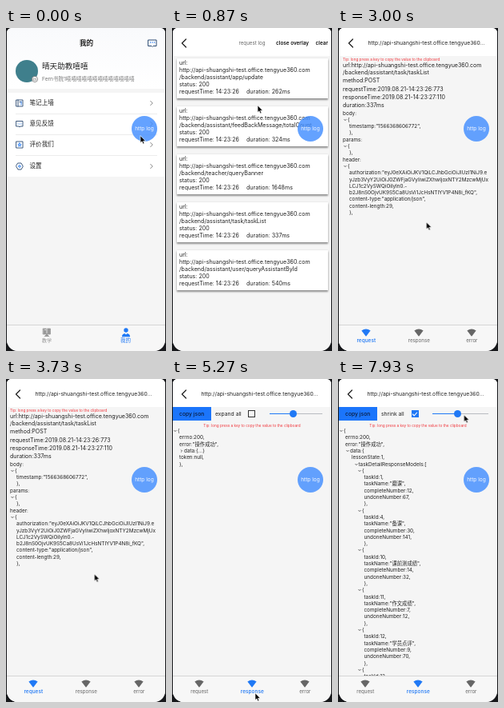
An HTML page that plays this animation: 200 by 404 pixels, repeating every 8000 ms.

```html
<!DOCTYPE html>
<html>
<head>
<meta charset="utf-8">
<title>Request log demo</title>
<style>
  :root { --blue: #2079f5; --grey: #666; }
  html, body { margin: 0; width: 100%; height: 100%; overflow: hidden; background: #17181b; }
  body { font: 6.35px Inter, "Noto Sans CJK SC", "Noto Sans CJK", sans-serif; color: #222; }
  #stage { position: relative; width: 200px; height: 404px; overflow: hidden; }
  #screen { position: absolute; inset: 0 1.5px 0 1px; overflow: hidden; border-radius: 6px 6px 14px 14px; background: #f5f5f5; }
  .page { position: absolute; left: -1px; top: 0; width: 200px; height: 404px; background: #f5f5f5; overflow: hidden; }
  .page *, .overlay { position: absolute; box-sizing: border-box; }
  .t { white-space: pre; line-height: 10px; margin-top: -5px; }
  .c { transform: translateX(-50%); }
  .bar { left: 0; top: 0; width: 200px; height: 34.5px; background: #fff; }
  .tabs { left: 0; top: 371px; width: 200px; height: 33px; background: #f7f7f7; border-top: .5px solid #d5d5d5; }
  svg { overflow: visible; fill: none; stroke-linecap: round; stroke-linejoin: round; }
  .card { left: 6px; width: 189px; height: 50px; background: #fff; box-shadow: 0 1.5px 2px rgba(0,0,0,.4), 0 0 1.5px rgba(0,0,0,.15); }
  .card div { left: 3px; font-size: 7.1px; }
  .tip { font-size: 4.7px; color: #f0353b; }

  /* One 8 s clock for everything */
  .page, .overlay, .step { animation: 8s linear infinite; }
  #home { animation-name: homeOut; }
  #log { animation-name: logMove; }
  #detail { animation-name: detailIn; }
  #cursor { left: 0; top: 0; animation-name: cursor; }
  .step { animation-timing-function: step-end; }
  .before { animation-name: before; }
  .after { animation-name: after; }
  .closed { animation-name: closed; }
  .open { animation-name: open; }

  @keyframes homeOut {
    0%, .7% { transform: none; animation-timing-function: cubic-bezier(.15,.7,.3,1); }
    5%, 100% { transform: translateX(-60px); }
  }
  @keyframes logMove {
    0%, .7% { transform: translateX(200px); animation-timing-function: cubic-bezier(.15,.7,.3,1); }
    5%, 34% { transform: none; animation-timing-function: cubic-bezier(.15,.6,.3,1); }
    37.5%, 100% { transform: translateX(-60px); }
  }
  @keyframes detailIn {
    0%, 34% { transform: translateX(200px); animation-timing-function: cubic-bezier(.15,.6,.3,1); }
    37.5% { transform: translateX(1px); }
    42%, 100% { transform: none; }
  }
  @keyframes before { 0% { visibility: visible; } 59.1%, 100% { visibility: hidden; } }
  @keyframes after { 0% { visibility: hidden; } 59.1%, 100% { visibility: visible; } }
  @keyframes closed { 0% { visibility: hidden; } 59.1% { visibility: visible; } 85.9%, 100% { visibility: hidden; } }
  @keyframes open { 0% { visibility: hidden; } 85.9%, 100% { visibility: visible; } }
  @keyframes cursor {
    0%, 5.5% { transform: translate(168px,135px); }
    10.875% { transform: translate(107px,97px); }
    13.5% { transform: translate(113px,79px); }
    17.5% { transform: translate(160px,122px); }
    21.6% { transform: translate(122px,161px); }
    22.5%, 24.5% { transform: translate(121px,178px); animation-timing-function: ease-out; }
    29.2%, 46.2% { transform: translate(110.5px,243px); animation-timing-function: ease-in-out; }
    53.4%, 71.2% { transform: translate(104px,393px); animation-timing-function: ease-in-out; }
    81.6%, 87.5% { transform: translate(93px,43px); animation-timing-function: ease-in-out; }
    91.6%, 92.8% { transform: translate(27px,44px); animation-timing-function: ease-out; }
    99.1%, 100% { transform: translate(157.5px,45px); }
  }
</style>
</head>
<body>
<div id="stage">
  <div id="screen">
    <div class="page" id="home"></div>
    <div class="page" id="log"></div>
    <div class="page" id="detail"></div>
  </div>
  <div class="overlay" style="left:157px;top:110px;width:32px;height:32px;border-radius:50%;background:rgba(66,142,255,.82);color:#f4f7fc;font-size:6.6px;line-height:32px;text-align:center;white-space:pre">http log</div>
  <svg class="overlay" id="cursor" width="8" height="11"><path d="M0 0V8.6L2 6.8L3.4 10L4.9 9.3L3.5 6.3H6.2Z" fill="#000" stroke="#fff" stroke-width=".6"/></svg>
</div>
<script>
const $ = id => document.getElementById(id);

// Text at x, vertically centred on y
const text = (s, x, y, style = '', cls = '') =>
  `<div class="t ${cls}" style="left:${x}px;top:${y}px;${style}">${s}</div>`;
const box = (x, y, w, h, style) =>
  `<div style="left:${x}px;top:${y}px;width:${w}px;height:${h}px;${style}"></div>`;
// Line drawing whose origin is (x, y)
const icon = (x, y, d, stroke, width = 1, fill = 'none') =>
  `<svg width="1" height="1" style="left:${x}px;top:${y}px"><path d="${d}" stroke="${stroke}" stroke-width="${width}" fill="${fill}"/></svg>`;
const group = (cls, html) => `<div class="step ${cls}" style="left:0;top:0">${html}</div>`;
const circle = r => `M${-r} 0a${r} ${r} 0 1 0 ${2 * r} 0a${r} ${r} 0 1 0 ${-2 * r} 0`;
const back = icon(15, 18.5, 'M2.5 -5L-2.5 0L2.5 5', '#222', 1.3);

function home() {
  const navy = '#2c4a72', blue = 'var(--blue)';
  const frame = 'M-4 -4H4V4H-4Z';
  const rows = [
    ['笔记上墙', frame + 'M-2 -4V4M0 -1.5H2', 'M2 -2V2'],
    ['意见反馈', 'M-4 -3.5H4V3H1L0 4L-1 3H-4Z', 'M-2 0h.1M0 0h.1M2 0h.1'],
    ['评价我们', frame, 'M0 -2L.6 -.6L2 -.5L1 .5L1.3 2L0 1.2L-1.3 2L-1 .5L-2 -.5L-.6 -.6Z'],
    ['设置', 'M-2 -4H2L4.3 0L2 4H-2L-4.3 0Z', circle(1.3)]
  ];
  let h = box(0, 0, 200, 76, 'background:linear-gradient(#f9fafc,#fff)')
    + text('我的', 100.5, 19, 'font-size:8.6px;font-weight:600', 'c')
    + icon(183, 18.5, 'M-5 -4H5V3.5H1L0 4.5L-1 3.5H-5Z', navy)
    + icon(183, 18.3, 'M-2.5 0h.1M0 0h.1M2.5 0h.1', blue, 1.3)
    + icon(26, 54, circle(14), 'none', 0, '#3f7f8c')
    + icon(36, 63.5, circle(3.6), '#777', .8, '#fff')
    + icon(36, 63.5, 'M-1.5 -.8H1.5V1.3H-1.5Z', '#777', .6)
    + text('晴天助教嘻嘻', 45, 48, 'font-size:9.6px;font-weight:500')
    + text('Fern书院1' + '嘻'.repeat(13), 45, 64, 'font-size:6.6px;color:#777')
    + box(0, 81, 200, 105, 'background:#fff');
  rows.forEach(([label, outer, inner], i) => {
    const y = 94 + i * 26.2;
    h += icon(17, y, outer, navy, .9) + icon(17, y, inner, blue, .9)
      + text(label, 29.5, y, 'font-size:7.6px;font-weight:500')
      + icon(181.5, y, 'M-1.3 -2.6L1.3 0L-1.3 2.6', '#777', .9);
    if (i < 3) h += box(12, y + 13, 177, .5, 'background:#ececec');
  });
  h += '<div class="tabs"></div>'
    + icon(51, 380.5, 'M-4.5 -5H4.5V2H-4.5ZM-3 5L0 2L3 5', '#999', .8, '#999')
    + icon(51, 379, 'M0 -3.5V2.5M-2.5 -1.5H-1.5', '#f7f7f7', .8)
    + icon(149.5, 378.3, circle(2.7), 'none', 0, blue)
    + icon(149.5, 383.5, 'M-5 2.3V1Q-4.5 -1.5 -1.5 -2L0 -.5L1.5 -2Q4.5 -1.5 5 1V2.3Z', 'none', 0, blue)
    + text('教学', 51, 391, 'font-size:6.2px;color:#999', 'c')
    + text('我的', 149.5, 391, `font-size:6.5px;color:${blue}`, 'c');
  return h;
}

function log() {
  const calls = [
    ['assistant/app/update', 262], ['assistant/feedBackMessage/totalCount', 324],
    ['teacher/queryBanner', 1648], ['assistant/task/taskList', 337],
    ['assistant/user/queryAssistantById', 540]
  ];
  const bold = 'font-size:6.4px;font-weight:600;color:#111';
  return '<div class="bar"></div>' + back
    + text('request log', 100, 18.5, 'font-size:6.2px;color:#666', 'c')
    + text('close overlay', 130, 18.5, bold) + text('clear', 179.5, 18.5, bold)
    + calls.map(([path, ms], i) => {
      const lines = ['url:', 'http://api-shuangshi-test.office.tengyue360.com',
        '/backend/' + path, 'status: 200', 'requestTime: 14:23:26'];
      return `<div class="card" style="top:${38 + i * 60}px">`
        + lines.map((s, n) => text(s, 3, 6.3 + n * 9)).join('')
        + `<div class="t" style="left:87px;top:42.3px">duration: ${ms}ms</div></div>`;
    }).join('');
}

// Lines of a JSON tree: [x, text, arrow], where arrow is 'v' or '>'
const tree = (lines, top) => lines.map(([x, s, arrow], i) => {
  const y = top + i * 8.3;
  const d = arrow === 'v' ? 'M-1.2 -.6L0 .6L1.2 -.6' : 'M-.6 -1.2L.6 0L-.6 1.2';
  return text(s, x, y) + (arrow ? icon(x - 3, y, d, '#333', .8) : '');
}).join('');

const tip = (x, y, cls) => text('Tip: long press a key to copy the value to the clipboard', x, y, '', 'tip ' + cls);

function request() {
  const facts = ['method:POST', 'requestTime:2019.08.21-14:23:26:773',
    'responseTime:2019.08.21-14:23:27:110', 'duration:337ms'];
  const size = 'font-size:7.05px';
  return tip(5, 39, '')
    + text('url:http://api-shuangshi-test.office.tengyue360.com', 5, 47, size)
    + text('/backend/assistant/task/taskList', 5, 56, size)
    + facts.map((s, i) => text(s, 5, 66.3 + i * 10.2, size)).join('')
    + tree([
      [5, 'body:'], [11, '{', 'v'], [13, 'timestamp:"1566368606772",'], [13, '},'],
      [5, 'params:'], [11, '{', 'v'], [13, '},'],
      [5, 'header:'], [11, '{', 'v'],
      [13, 'authorization:"eyJ0eXAiOiJKV1QiLCJhbGciOiJIUzI1NiJ9.e'],
      [13, 'yJzb3VyY2UiOiJ0ZWFjaGVyIiwiZXhwIjoxNTY2MzcwMjUx'],
      [13, 'LCJ1c2VySWQiOiIyIn0.-'],
      [13, 'b2J8nS0OjvUK9S5Ca8UsVi1JcHsNTIYV1P4N8i_fKQ",'],
      [13, 'content-type:"application/json",'], [13, 'content-length:29,'], [13, '},']
    ], 106.5);
}

// Controls differ in label and shift left when the tree is open
function controls(label, checkX, trackX, thumbX, checked) {
  const blue = 'background:var(--blue)';
  return text(label, 54, 43.5, 'font-size:6.8px')
    + box(checkX, 39, 9, 9, checked ? blue : 'border:.9px solid #333')
    + (checked ? icon(checkX + 4.5, 43.5, 'M-2.6 0L-.8 1.9L2.7 -2', '#fff', 1.1) : '')
    + box(trackX, 43, 188 - trackX, 1, 'background:#b9bcc1')
    + box(trackX, 43, thumbX - trackX, 1, blue)
    + box(thumbX - 4.6, 38.9, 9.2, 9.2, blue + ';border-radius:50%');
}

function response() {
  const tasks = [[1, '磨课', 12, 67], [4, '备课', 30, 141], [10, '课前测成绩', 14, 32],
    [11, '作文成绩', 7, 12], [12, '学员点评', 9, 70], [13, '课后', 5, 20]];
  const head = [[7, '{', 'v'], [9, 'errno:200,'], [9, 'error:"操作成功",']];
  const open = [...head, [15, 'data:{', 'v'], [17, 'lessonState:1,'],
    [25.5, 'taskDetailResponseModels:[', 'v']];
  for (const [id, name, done, left] of tasks)
    open.push([30, '{', 'v'], [32.5, `taskId:${id},`], [32.5, `taskName:"${name}",`],
      [32.5, `completeNumber:${done},`], [32.5, `undoneNumber:${left},`], [32.5, '},']);
  const shut = [...head, [15, 'data:{...}', '>'], [9, 'token:null,'], [9, '},']];
  return group('after', box(0, 35.3, 49, 17, 'background:#1b75fb')
      + text('copy json', 9, 43.8, 'font-size:6.8px;font-weight:500;color:#0b1c3c') + tip(100, 58, 'c'))
    + group('closed', controls('expand all', 95, 122, 151.5, false) + tree(shut, 65))
    + group('open', controls('shrink all', 91.5, 118, 149.5, true) + tree(open, 65));
}

function detailTabs(active) {
  const fan = 'M-5.6 -2.4Q0 -6.4 5.6 -2.4L.5 4.3Q0 4.9 -.5 4.3Z';
  return ['request', 'response', 'error'].map((s, i) => {
    const x = 34.3 + i * 66, on = i === active, color = on ? 'var(--blue)' : 'var(--grey)';
    return icon(x, 380.5, fan, 'none', 0, color)
      + text(s, x, 391, `font-size:${on ? 6.5 : 6.2}px;color:${color};font-weight:${on ? 500 : 400}`, 'c');
  }).join('');
}

$('home').innerHTML = home();
$('log').innerHTML = log();
$('detail').innerHTML = '<div class="bar"></div>' + back
  + text('http://api-shuangshi-test.office.tengyue360...', 109.5, 18.5, 'font-size:6.75px', 'c')
  + group('before', request()) + response()
  + '<div class="tabs"></div>'
  + group('before', detailTabs(0)) + group('after', detailTabs(1));
</script>
</body>
</html>
```
